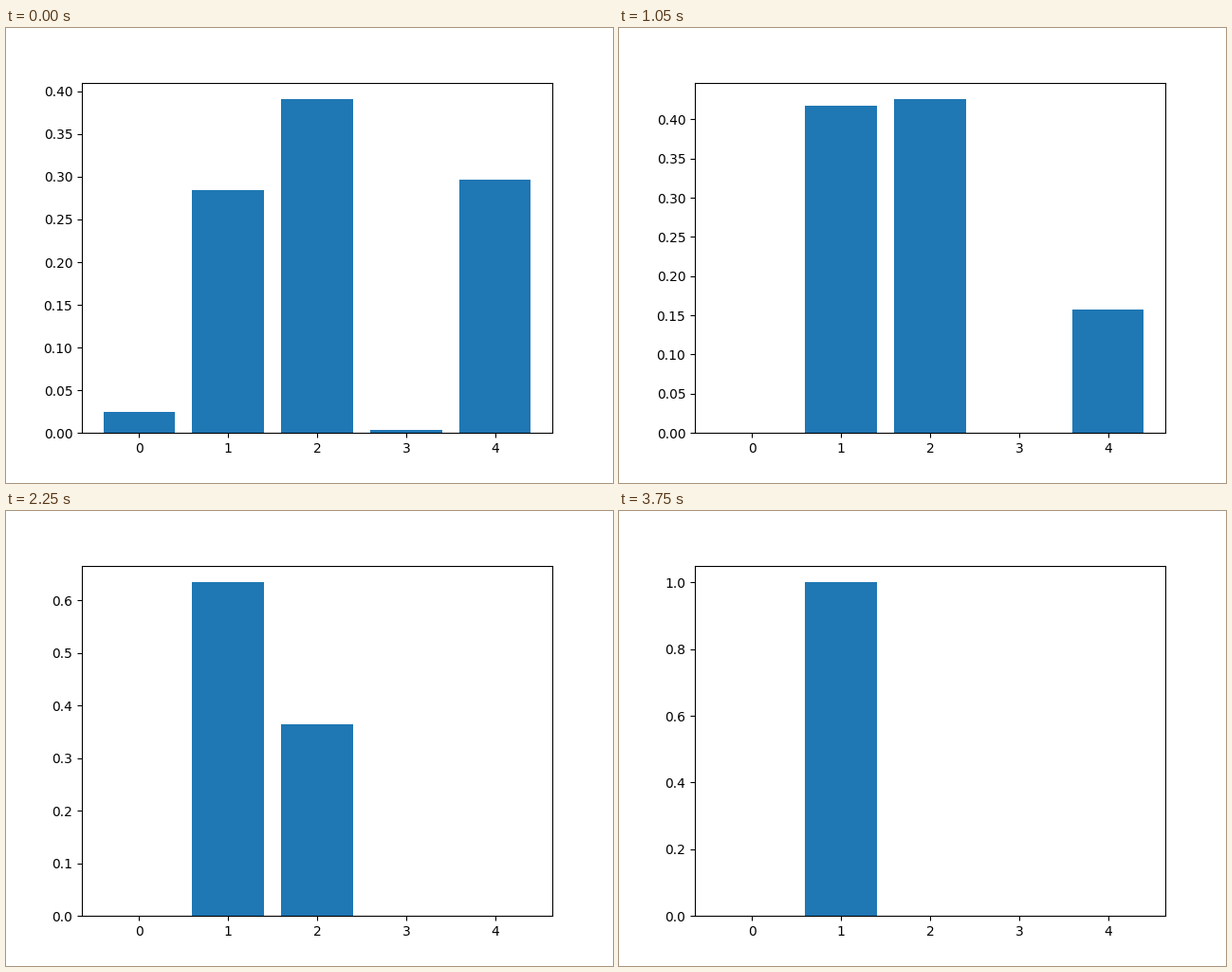
Recreate the animation shown at these times as a matplotlib script. Size 640 px wide and 480 px high, loop 8 s.

```python
import matplotlib.pyplot as plt
import numpy as np
from matplotlib.animation import FuncAnimation

INTERVAL = 50
FRAMES = 160
HOLD = 3           # frames per step
LAST_STEP = 25     # all the weight sits on one bar from here on
DUEL = 11          # only two bars remain from this step
GROWTH = 1.09

knots = [0, 3, 7, DUEL]
rise1 = np.polyfit(knots, [0.2845, 0.3315, 0.4172, 0.5561], 3)
rise2 = np.polyfit(knots, [0.3907, 0.4092, 0.4255, 0.4439], 3)


def weights(step):
    """Distribution over the five bars, always summing to one."""
    if step < DUEL:
        w0 = max(0.0246 - 0.0123 * step, 0)
        w3 = 0.0036 if step == 0 else 0
        w1, w2 = np.polyval(rise1, step), np.polyval(rise2, step)
        return [w0, w1, w2, w3, 1 - w0 - w1 - w2 - w3]
    gap = 0.1122 + 0.0344 * (GROWTH ** (step - DUEL) - 1) / (GROWTH - 1)
    gap = min(gap, 1)
    return [0, (1 + gap) / 2, (1 - gap) / 2, 0, 0]


fig, ax = plt.subplots(figsize=(6.4, 4.8), dpi=100)
bars = ax.bar(range(5), weights(0), color="#1f77b4")


def update(frame):
    heights = weights(min(frame // HOLD, LAST_STEP))
    for bar, h in zip(bars, heights):
        bar.set_height(h)
    ax.set_ylim(0, 1.05 * max(heights))
    return bars


anim = FuncAnimation(fig, update, frames=FRAMES, interval=INTERVAL,
                     repeat=True, repeat_delay=0)
plt.show()
```
